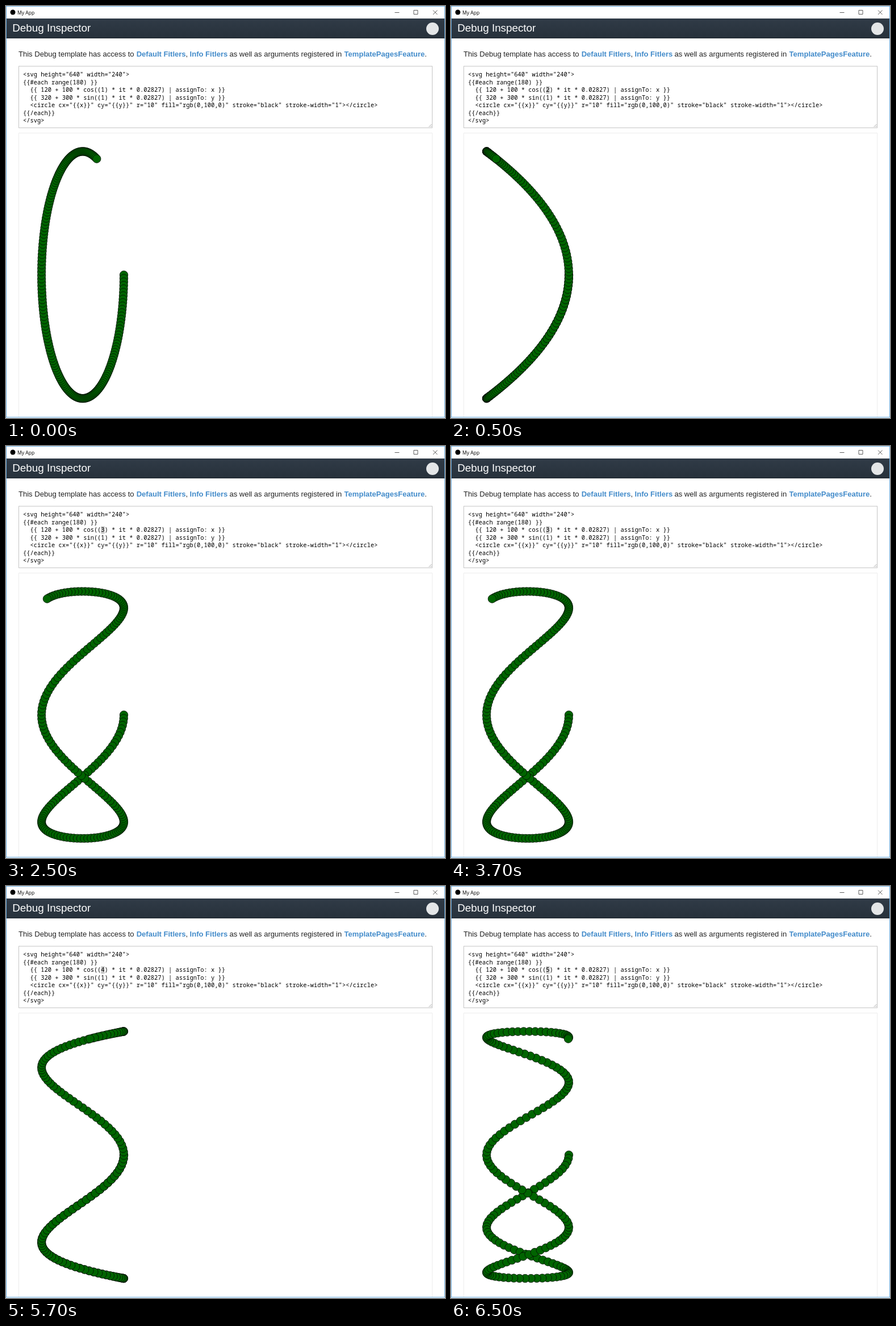
Write an HTML page that moves like this. It is 773 by 725 pixels and loops after 8000 ms.

```html
<!DOCTYPE html>
<html lang="en">
<head>
<meta charset="utf-8">
<title>Debug Inspector</title>
<style>
  html, body { margin: 0; width: 100%; height: 100%; overflow: hidden; background: #fff; }
  svg { display: block; }
  text { white-space: pre; font-family: "Liberation Sans", Arial, sans-serif; }
  .title { font: 8.6px "Open Sans", sans-serif; }
  .intro { font-size: 13.04px; fill: #212121; }
  .intro .link { font-weight: bold; fill: #428bca; }
  #code text { font: 10.41px "Noto Sans Mono", monospace; }
</style>
</head>
<body>
<svg width="773" height="725" viewBox="0 0 773 725">
  <defs>
    <linearGradient id="bar" x2="0" y2="1">
      <stop stop-color="#303b47"/>
      <stop offset="1" stop-color="#27313b"/>
    </linearGradient>
  </defs>
  <rect x=".5" y=".5" width="772" height="723" fill="#fff" stroke="#6fb1e4"/>

  <circle cx="12" cy="11" r="4.5"/>
  <text class="title" x="20" y="14.7">My App</text>
  <path d="M684.5 11.5h8M718 7.5h7v7h-7zM752 7.5l7.5 7.5M759.5 7.5l-7.5 7.5" fill="none" stroke="#333" stroke-width=".8"/>

  <rect x="1" y="22" width="771" height="35" fill="url(#bar)"/>
  <path d="M1 56.5h771" stroke="#1d252d"/>
  <text x="11.2" y="45.4" font-size="18.84" fill="#fff">Debug Inspector</text>
  <circle cx="751" cy="40" r="11" fill="#e4e6e8"/>

  <text class="intro" y="89.3"><tspan x="22">This Debug template has access to </tspan><tspan class="link" x="229.7">Default Fitlers</tspan>, <tspan class="link" x="323.6">Info Fitlers</tspan><tspan x="393.4">as well as arguments registered in </tspan><tspan class="link" x="595.6">TemplatePagesFeature</tspan>.</text>

  <rect x="22.5" y="106" width="728" height="108.3" fill="#fff" stroke="#c4c4c4"/>
  <path d="M744.5 213l5-5M747.5 213l2-2" stroke="#888" stroke-width=".7"/>
  <rect id="mark" x="167.3" y="141.3" width="6.4" height="13" fill="#c8c8c8"/>
  <g id="code"></g>

  <path d="M22.5 723V223.5H750.5V723" fill="none" stroke="#ececec"/>
  <g id="plot" transform="translate(48.1 241.4) scale(.7245)" fill="rgb(0,100,0)" stroke="#000"></g>
</svg>
<script>
const $ = id => document.getElementById(id);

function add(parent, tag, attrs) {
  const el = document.createElementNS("http://www.w3.org/2000/svg", tag);
  for (const key in attrs) el.setAttribute(key, attrs[key]);
  return parent.appendChild(el);
}

const lines = n => [
  '<svg height="640" width="240">',
  '{{#each range(180) }}',
  `  {{ 120 + 100 * cos((${n}) * it * 0.02827) | assignTo: x }}`,
  '  {{ 320 + 300 * sin((1) * it * 0.02827) | assignTo: y }}',
  '  <circle cx="{{x}}" cy="{{y}}" r="10" fill="rgb(0,100,0)" stroke="black" stroke-width="1"></circle>',
  '{{/each}}',
  '</svg>'
];

const rows = lines(1).map((_, i) => add($("code"), "text", { x: 30, y: 124 + 13.58 * i }));
const dots = Array.from({ length: 180 }, () => add($("plot"), "circle", { r: 10 }));
let shown = 0;

function draw(n) {
  lines(n).forEach((line, i) => rows[i].textContent = line);
  $("mark").setAttribute("visibility", n > 1 ? "visible" : "hidden");
  dots.forEach((dot, it) => {
    dot.setAttribute("cx", 120 + 100 * Math.cos(n * it * 0.02827));
    dot.setAttribute("cy", 320 + 300 * Math.sin(it * 0.02827));
  });
  shown = n;
}

const start = performance.now();

function tick() {
  const t = (performance.now() - start) % 8000;
  const n = 1 + Math.floor((t + 1500) / 2000);
  if (n !== shown) draw(n);
  requestAnimationFrame(tick);
}
tick();
</script>
</body>
</html>
```
